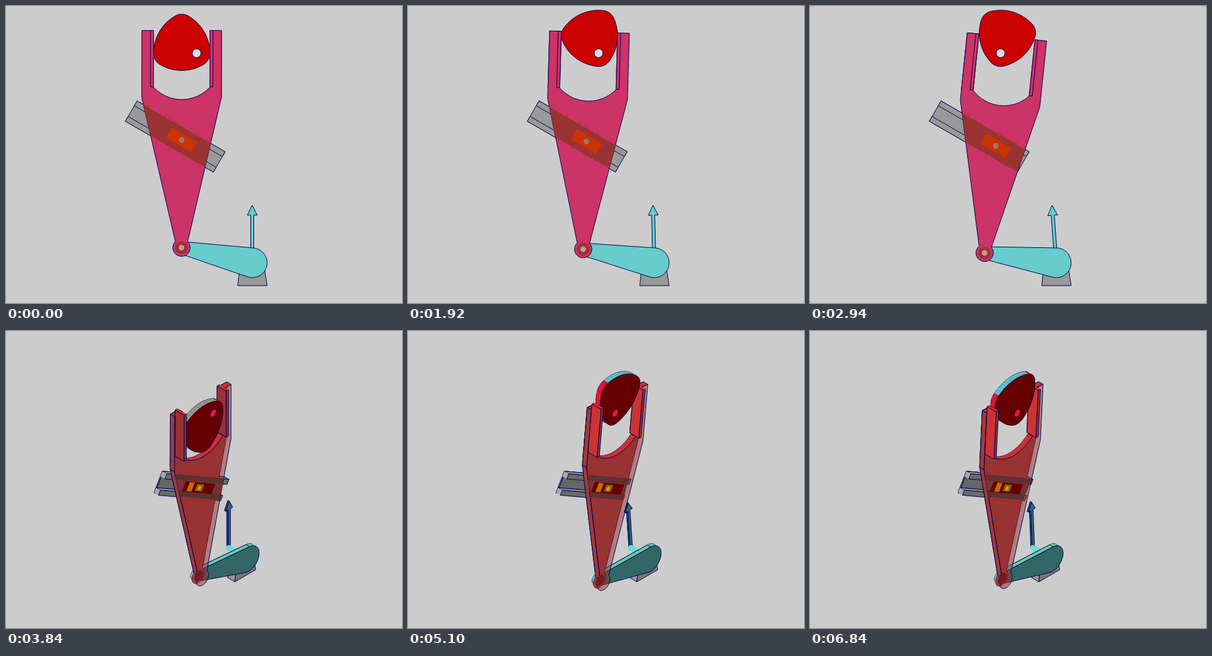
Animation of 640 by 480 pixels, one loop 6.9 s. Source, as an HTML page with a canvas:

```html
<!DOCTYPE html>
<html>
<head>
<meta charset="utf-8">
<style>
html, body { margin: 0; height: 100%; overflow: hidden; background: #ccc; }
canvas { display: block; }
</style>
</head>
<body>
<canvas id="stage" width="640" height="480"></canvas>
<script>
const ctx = document.getElementById('stage').getContext('2d');
const { sin, cos, atan, atan2, acos, hypot, PI, abs, max, min, floor } = Math;
const rad = PI / 180, LINE = '#00004d';
const camPivot = [308, 76.3], crankPivot = [398, 415];
const SIDE = 48, TIP = 21.5, ARM = 174, CRANK = 116.9;
let view = 0;

// Turn a mechanism point into a stage point; view 0 is flat, 1 is isometric
function project([x, y], z) {
  const yaw = view * PI / 4, pitch = view * atan(Math.SQRT1_2), X = x - 320;
  const depth = z * cos(yaw) - X * sin(yaw);
  return [320 + X * cos(yaw) + z * sin(yaw),
          240 + 8 * view + (y - 240) * cos(pitch) + depth * sin(pitch)];
}

const place = ([ox, oy], a) => ([x, y]) =>
  [ox + x * cos(a) - y * sin(a), oy + x * sin(a) + y * cos(a)];
const rect = (x0, y0, x1, y1) => [[x0, y0], [x1, y0], [x1, y1], [x0, y1]];

function arc([x, y], r, from, to, steps = 12) {
  return Array.from({ length: steps + 1 }, (_, i) => {
    const a = from + (to - from) * i / steps;
    return [x + r * cos(a), y + r * sin(a)];
  });
}

function trace(pts) {
  ctx.beginPath();
  pts.forEach(p => ctx.lineTo(...p));
  ctx.closePath();
}

function paint(pts, fill, line = LINE) {
  trace(pts);
  ctx.fillStyle = fill;
  ctx.fill();
  if (line) {
    ctx.strokeStyle = line;
    ctx.stroke();
  }
}

const flat = (pts, z, fill, line) => paint(pts.map(p => project(p, z)), fill, line);
const disc = (c, r, z, fill, line) => flat(arc(c, r, 0, 2 * PI, 32), z, fill, line);

// Extruded outline: back face, the walls that face the viewer, front face
function prism(pts, z0, z1, front, wall, back = front) {
  const f = pts.map(p => project(p, z1)), b = pts.map(p => project(p, z0));
  if (view) {
    let area = 0;
    f.forEach((p, i) => {
      const q = f[(i + 1) % f.length];
      area += p[0] * q[1] - q[0] * p[1];
    });
    paint(b, back);
    f.forEach((p, i) => {
      const j = (i + 1) % f.length, q = f[j];
      const dx = q[0] - p[0], dy = q[1] - p[1];
      const turn = dx * (b[i][1] - p[1]) - dy * (b[i][0] - p[0]);
      if (turn * area < 0) {
        const fill = typeof wall === 'function' ? wall(i, dx, dy) : wall;
        paint([p, q, b[j], b[i]], fill, hypot(dx, dy) > 14 ? LINE : null);
      }
    });
  }
  paint(f, front);
}

const tone = (plain, turned) => view ? turned : plain;

// Corners of the constant-width cam: the pivot corner and the two others
const camCorners = turn => [camPivot, ...[180, 240].map(a =>
  [camPivot[0] + SIDE * cos((a + turn) * rad), camPivot[1] + SIDE * sin((a + turn) * rad)])];

// Middle of the cam measured along direction a
function camMiddle(corners, a) {
  const d = corners.map(([x, y]) => x * cos(a) + y * sin(a));
  const hi = max(...d), lo = min(...d), c = (d[0] + d[1] + d[2]) / 3;
  return hi - c > c - lo ? hi - SIDE / 2 : lo + SIDE / 2;
}

function linkage(u) {
  const pin = [283.7 + u * cos(PI / 6), 216.5 + u * sin(PI / 6)];
  const dx = pin[0] - crankPivot[0], dy = pin[1] - crankPivot[1], d = hypot(dx, dy);
  const swing = atan2(dy, dx) - acos((CRANK ** 2 + d * d - ARM ** 2) / (2 * CRANK * d));
  const foot = [crankPivot[0] + CRANK * cos(swing), crankPivot[1] + CRANK * sin(swing)];
  return { pin, foot, swing, tilt: atan2(pin[0] - foot[0], foot[1] - pin[1]) };
}

// Slide the fork along its rail until its jaws hold the cam
function solve(corners) {
  let lo = -15, hi = 45;
  for (let i = 0; i < 30; i++) {
    const u = (lo + hi) / 2, { pin, tilt } = linkage(u);
    const gap = pin[0] * cos(tilt) + pin[1] * sin(tilt) - camMiddle(corners, tilt);
    if (gap < 0) lo = u; else hi = u;
  }
  return linkage(lo);
}

const onRail = place([273.5, 210.9], PI / 6);
const railBox = (y0, y1) => rect(-82.2, y0, 82.2, y1).map(onRail);
const basePlate = [[378, 420], [417, 420], [422, 452], [374.5, 452]];
const forkShape = [
  [-64.5, -177], [-45.5, -177], ...arc([0, -127.3], 61.8, PI - 0.743, 0.743, 24),
  [45.5, -177], [64.5, -177], [64.5, -70],
  ...arc([0, ARM], 14, -0.78, PI + 0.78, 24), [-64.5, -68]
];
const arrowShape = [[-2.5, 0], [-2.5, -77], [-8, -77], [0, -93], [8, -77], [2.5, -77], [2.5, 0]];

function drawRail() {
  const wall = (i, dx) => abs(dx) > 40 ? '#999' : '#aaa';
  prism(railBox(-19, 19), 13, 15, tone('#999', '#666'), wall);
  for (const y of [-19, 10]) prism(railBox(y, y + 9), 13, 23, tone('#999', '#6a6a6a'), wall);
}

function drawCrank({ foot, swing }) {
  const turn = swing + PI - atan2(24.5, 114.3);
  prism(arrowShape.map(place(crankPivot, turn)), -23, -20, tone('#6cc', '#336677'), '#336677');
  prism(basePlate, 0, 16, tone('#999', '#777'), '#999');
  if (view) {
    ctx.save();
    ctx.beginPath();
    ctx.moveTo(...project(crankPivot, -21));
    ctx.lineTo(...project(crankPivot, 10));
    ctx.lineCap = 'round';
    ctx.lineWidth = 9;
    ctx.strokeStyle = '#6dd';
    ctx.stroke();
    ctx.restore();
  }
  const lean = acos((24 - 10) / CRANK);
  const body = [...arc(crankPivot, 24, swing + lean, swing + 2 * PI - lean, 24),
                ...arc(foot, 10, swing - lean, swing + lean)];
  prism(body, 16, 24, tone('#6cc', '#366'), (i, dx, dy) => dx > abs(dy) ? '#6ca' : '#6cc');
}

function drawFork({ pin, foot, tilt }) {
  const shape = forkShape.map(place(pin, tilt));
  const wall = (i, dx, dy) => dx > abs(dy) / 4 ? '#c33' : '#a03a3a';
  prism(shape, 23, 33, tone('#c36', 'rgba(153,51,51,.5)'), wall, '#933');

  ctx.save();
  trace(shape.map(p => project(p, 33)));
  ctx.clip();
  flat(railBox(-19, 19), 20, tone('#933', '#5e3030'), null);
  if (view) flat(railBox(-9, 9), 18, '#733', null);
  const onSlider = place(pin, PI / 6);
  if (view) {
    flat(rect(-38, -9, 40, 9).map(onSlider), 23, '#600', null);
    flat(rect(-27, -8, -14, 8).map(onSlider), 23, '#c60', null);
    flat(rect(-6, -6, 12, 6).map(onSlider), 23, '#860', null);
  } else {
    flat(rect(-23.5, -9.5, 23.5, 9.5).map(onSlider), 23, '#c30', null);
    [[229, 162], [257, 178], [277, 190], [306, 207], [333, 222],
     [265, 229], [285, 241], [314, 257]].forEach(p => disc(p, 2, 23, '#b33a22', null));
  }
  ctx.restore();

  disc(pin, tone(4.5, 4), 25, tone('#977', '#ca0'), null);
  disc(foot, 10, 24, tone('#933', '#622'), null);
  disc(foot, 4.5, 29, tone('#c99', '#911'), null);
}

const drawPad = ({ pin, tilt }, x) =>
  prism(rect(x, -177, x + 5, -86).map(place(pin, tilt)), 20, 41, tone('#c36', '#933'),
        (i, dx) => dx > 2 ? '#c33' : '#933');

function drawCam([p, v1, v2], turn) {
  const arcs = [[p, TIP], [v2, SIDE + TIP], [v1, TIP], [p, SIDE + TIP], [v2, TIP], [v1, SIDE + TIP]];
  const rim = ['#f01530', '#f01530', '#f01530', '#5bc4cc', '#f01530', '#999988'];
  const body = arcs.flatMap(([c, r], i) =>
    arc(c, r, (60 * i + turn) * rad, (60 * i + 60 + turn) * rad, 11));
  prism(body, 23, 33, tone('#c00', '#600'), i => rim[floor(i / 12)]);
  disc(p, 7, 33, tone('#ddd', '#f01530'));
}

function camTurn(n) {
  if (n < 1) return 0;
  if (n < 49) return 24 * n - 12;
  return 77 + 24 * (n < 55 ? n - 49 : max(n, 61) - 55);
}

function draw(now) {
  const n = floor(now % 6900 / 60);
  view = min(1, max(0, (n - 56) / 5));
  const turn = camTurn(n), corners = camCorners(turn), pose = solve(corners);
  ctx.fillStyle = '#ccc';
  ctx.fillRect(0, 0, 640, 480);
  ctx.lineWidth = 1;
  ctx.lineJoin = 'round';

  drawRail();
  drawCrank(pose);
  drawFork(pose);
  drawPad(pose, 45.5);
  drawCam(corners, turn);

  // The left jaw stands nearer than the cam
  ctx.save();
  trace(rect(-200, -250, -45, -84).map(place(pose.pin, pose.tilt)).map(p => project(p, 33)));
  ctx.clip();
  drawFork(pose);
  ctx.restore();
  drawPad(pose, -50.5);
}

const start = performance.now();
function tick() {
  draw(performance.now() - start);
  requestAnimationFrame(tick);
}
tick();
</script>
</body>
</html>
```
